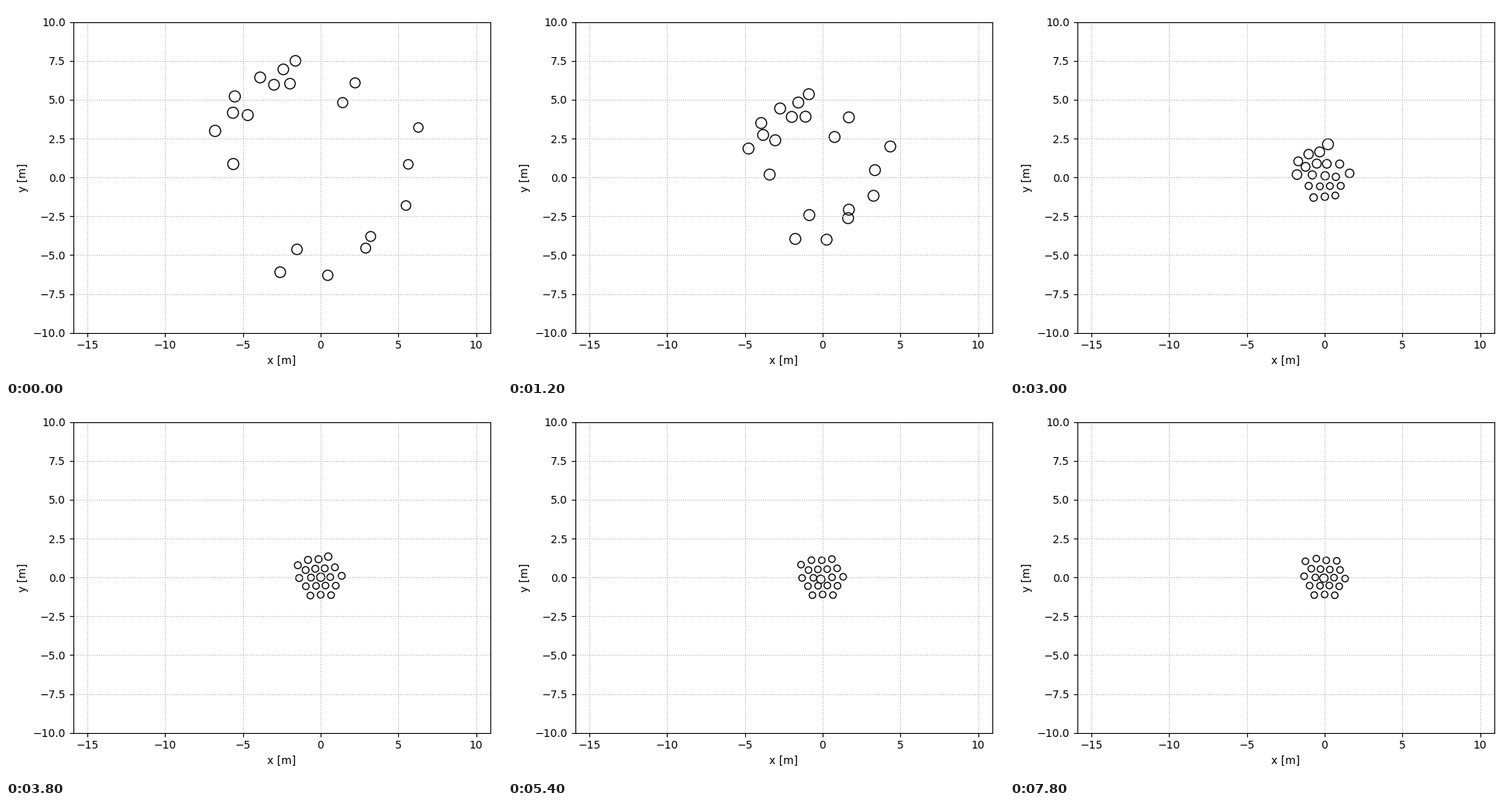
These frames come from a looping animation (640 px wide and 480 px high, 8 s). A matplotlib script:

```python
import matplotlib.pyplot as plt
import numpy as np
from matplotlib.animation import FuncAnimation
from matplotlib.patches import Circle

FRAMES, STEP_MS = 40, 200
SPEED = 0.384             # metres per step
BRAKE = 2.0               # braking time constant, in steps
REST_R, WALK_R = 0.21, 0.35
CORE_R = 0.265
GAP = 0.6                 # least distance between standing walkers

# Starting places in metres: first the walker bound for the goal itself,
# then inner ring and outer ring counter-clockwise, then the odd one out.
START = [
    (1.42, 4.81),
    (5.64, 0.84), (-1.97, 6.03), (-3.00, 5.96),
    (-4.69, 4.01), (-1.52, -4.63), (3.22, -3.80),
    (6.29, 3.21), (2.22, 6.08), (-1.62, 7.50), (-2.40, 6.95),
    (-3.89, 6.43), (-5.64, 4.16), (-6.79, 2.99), (-5.62, 0.86),
    (-2.60, -6.10), (0.46, -6.30), (2.90, -4.55), (5.49, -1.81),
    (-5.52, 5.21)]
start = np.array([complex(x, y) for x, y in START])


def ring(count, radius, ripple=0):
    a = np.arange(count) * 2 * np.pi / count
    return (radius + ripple * np.cos(6 * a)) * np.exp(1j * a)


def crowd():
    """Hexagonal packing around the goal, eased apart where too tight."""
    spots = np.concatenate([[0], ring(6, 0.585), ring(12, 1.21, 0.11),
                            [1.48 * np.exp(1j * np.radians(147))]])
    for _ in range(30):
        gap = spots[:, None] - spots
        dist = np.abs(gap) + np.eye(len(spots))
        push = gap / dist * np.maximum(0, GAP - dist)
        spots = spots + 0.2 * push.sum(axis=1)
    return spots


slots = crowd()
swirl = np.radians(14) * (0.5 + 0.5 * np.sin(np.angle(slots))) * np.abs(slots) / 1.4
length = np.abs(slots - start)


def state(n):
    """Centres and radii of all walkers at step n."""
    # steady walk, then exponential braking in front of the slot
    brake_at = length / SPEED - BRAKE
    braking = SPEED * BRAKE * np.exp(-np.maximum(n - brake_at, 0) / BRAKE)
    left = np.where(n < brake_at, length - SPEED * n, braking)

    # the outer, upper part of the crowd turns slowly clockwise
    turn = np.clip((n - 31) / 16, -0.5, 0.5)
    aim = slots * np.exp(-1j * swirl * turn)
    pos = aim + (start - aim) * left / length

    # the innermost walker keeps swaying across the goal
    sway = 0.17 * np.cos(0.965 * (n - 23) - 0.872)
    pos[0] += np.clip((n - 15) / 8, 0, 1) * sway * (0.72 + 0.69j)

    pace = np.minimum(1, left / (SPEED * BRAKE))
    r = REST_R + (WALK_R - REST_R) * pace
    r -= (0.02 + 0.0045 * start.real) * np.exp(-n / 2)
    r[0] = max(r[0], CORE_R)
    return pos, r


fig, ax = plt.subplots(figsize=(6.4, 4.8), dpi=100)
ax.set(xlim=(-15.93, 10.93), ylim=(-10, 10), xlabel="x [m]", ylabel="y [m]")
ax.grid(linestyle=":")
fig.tight_layout()
fig.subplots_adjust(top=459.4 / 480)

# equal scale on both axes
box = ax.get_window_extent()
half = 10 * box.width / box.height
ax.set_xlim(-2.5 - half, -2.5 + half)

circles = [ax.add_patch(Circle((0, 0), 1, fill=False, ec="black", lw=1))
           for _ in start]


def draw(n):
    for circle, p, r in zip(circles, *state(n)):
        circle.center = p.real, p.imag
        circle.set_radius(r)
    return circles


anim = FuncAnimation(fig, draw, frames=FRAMES, interval=STEP_MS,
                     init_func=lambda: draw(0), repeat=True, repeat_delay=0)
plt.show()
```
